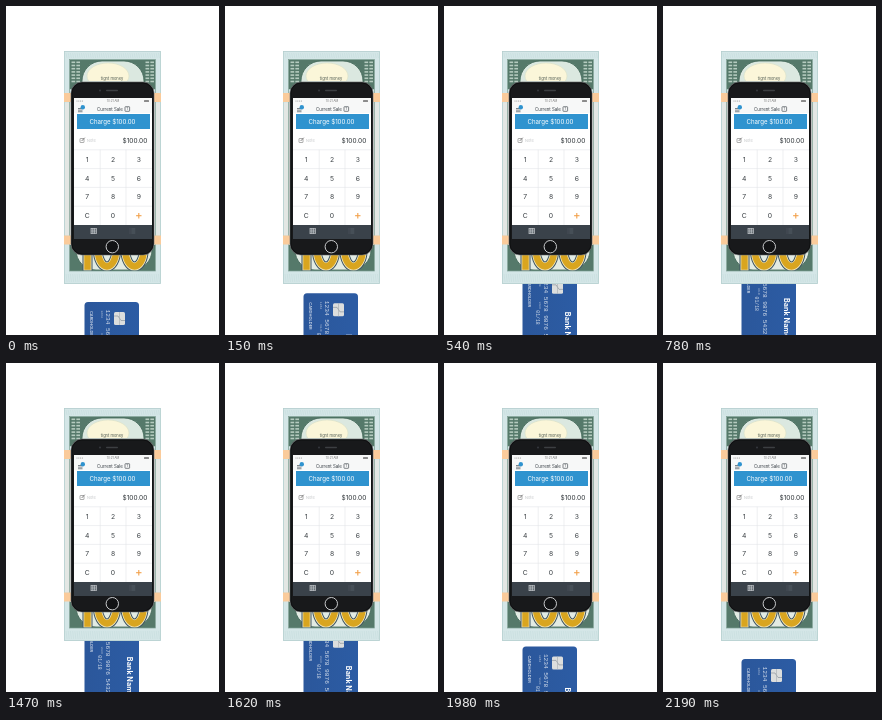
An HTML page with a canvas for the animation above (2550 ms loop, 213 by 329 pixels).

```html
<!DOCTYPE html>
<html lang="en">
<head>
<meta charset="utf-8">
<title>Card payment</title>
<style>
html, body { margin: 0; width: 100%; height: 100%; overflow: hidden; background: #fff; }
canvas { display: block; width: 213px; height: 329px; }
</style>
</head>
<body>
<canvas id="stage"></canvas>
<script>
const W = 213, H = 329, LOOP = 2550, STEP = 30;
const OUT = 296, IN = 251;
const SANS = 'Inter, Lato, sans-serif';
const MONO = '"Liberation Mono", monospace';
const stage = document.getElementById('stage');
const ratio = window.devicePixelRatio || 1;
let c;

function layer(canvas) {
  canvas.width = W * ratio;
  canvas.height = H * ratio;
  const ctx = canvas.getContext('2d');
  ctx.scale(ratio, ratio);
  return ctx;
}

function paint(fill, line, width = 1) {
  if (fill) { c.fillStyle = fill; c.fill(); }
  if (line) { c.strokeStyle = line; c.lineWidth = width; c.stroke(); }
}

function rect(x, y, w, h, fill) {
  c.fillStyle = fill;
  c.fillRect(x, y, w, h);
}

function round(x, y, w, h, r, fill, line, width) {
  c.beginPath();
  c.roundRect(x, y, w, h, r);
  paint(fill, line, width);
}

function ellipse(x, y, rx, ry, fill, line, width) {
  c.beginPath();
  c.ellipse(x, y, rx, ry, 0, 0, Math.PI * 2);
  paint(fill, line, width);
}

function path(points, color, width) {
  c.beginPath();
  points.forEach(([x, y], i) => i ? c.lineTo(x, y) : c.moveTo(x, y));
  paint(null, color, width);
}

function text(str, x, y, size, fill, align = 'center', weight = 400, family = SANS) {
  c.font = `${weight} ${size}px ${family}`;
  c.textAlign = align;
  c.fillStyle = fill;
  c.fillText(str, x, y);
}

// Text that reads downwards, with its baseline on the left.
function textDown(str, x, y, size, fill, weight, family) {
  c.save();
  c.translate(x, y);
  c.rotate(Math.PI / 2);
  text(str, 0, 0, size, fill, 'left', weight, family);
  c.restore();
}

function clipped(x, y, w, h, draw) {
  c.save();
  c.beginPath();
  c.rect(x, y, w, h);
  c.clip();
  draw();
  c.restore();
}

// Ladder of pale bars on the dark engraving.
function ladder(x, y, w, h) {
  for (let i = 0; i < h; i += 3.2) {
    rect(x, y + i, w / 2 - 0.6, 1.6, '#b5cbbf');
    rect(x + w / 2 + 0.6, y + i, w / 2 - 0.6, 1.6, '#b5cbbf');
  }
}

function drawHundred() {
  const outline = [['#3f5560', 10], ['#efe5bc', 8], ['#d9a51f', 6.4]];
  for (const [color, width] of outline) {
    path([[81.5, 236], [81.5, 260.5 + width / 2]], color, width);
    for (const x of [101, 128.5]) ellipse(x, 245, 9, 15.5, null, color, width);
  }
}

function drawBill() {
  rect(58, 45, 97, 233, '#d4e6e7');
  rect(59, 97, 95, 132, '#e3e7e4');
  for (let x = 60; x < 154; x += 2.2) {
    path([[x, 47], [x + 1, 52]], '#c3dadb', 0.5);
    path([[x, 268], [x + 1, 276]], '#c3dadb', 0.5);
  }
  c.strokeStyle = '#b3cdcc';
  c.lineWidth = 0.7;
  c.strokeRect(58.4, 45.4, 96.2, 232.2);

  clipped(63.5, 53.5, 86, 30, () => {
    rect(63.5, 53.5, 86, 30, '#55796a');
    round(76, 55, 62, 50, 20, '#dbe8e0', '#3f6556', 0.8);
    ellipse(102, 70, 21, 13, '#fbf6d9', '#d9dfc4', 0.6);
    rect(78, 75, 58, 8, '#d5e2d8');
  });
  text('tight money', 106, 73.5, 4, '#4d584f');
  ladder(65.5, 55.5, 8.5, 20);
  ladder(139.5, 55.5, 8.5, 20);

  clipped(63.5, 232, 86, 33, () => {
    rect(63.5, 239, 86, 26, '#55796a');
    round(70, 215, 76, 49, 20, '#e2ebe3', '#3f6556', 0.8);
    drawHundred();
  });
  c.strokeStyle = '#7d9e92';
  c.strokeRect(63.5, 53.5, 86, 211.5);
  for (const y of [87, 229.5]) rect(58, y, 97, 9, '#facb9b');
}

function drawHeader() {
  for (let i = 0; i < 4; i++) ellipse(71 + i * 1.8, 95, 0.6, 0.6, '#999');
  text('10:21 AM', 107, 96.2, 3, '#777');
  round(138, 94, 5, 2, 0.5, '#8b8b8b');
  for (let i = 0; i < 3; i++) rect(72, 102 + i * 1.7, 4.5, 0.8, '#5d6870');
  ellipse(76.8, 101.2, 2.2, 2.2, '#2f93cf');
  text('Current Sale', 104, 104.6, 4.4, '#333a40');
  round(119, 100.7, 4.6, 4.6, 0.5, null, '#4b5258', 0.7);
  text('1', 121.3, 104.4, 3.5, '#4b5258');

  rect(71, 108, 73, 15, '#2f93cf');
  text('Charge $100.00', 106.5, 117.9, 6.1, '#fff');

  round(74, 132.5, 4, 4, 0.5, null, '#777', 0.6);
  path([[75.6, 135], [78.8, 131.7]], '#666', 0.8);
  text('Note', 81, 136.2, 3.9, '#c4c6c8', 'left');
  text('$100.00', 141.3, 137.3, 6.5, '#30363a', 'right');
}

function drawKeys() {
  const top = 143.8, rowH = 18.8;
  for (let i = 0; i < 4; i++) {
    path([[68, top + i * rowH], [146, top + i * rowH]], '#e2e5e7', 0.6);
  }
  for (const x of [94.2, 120]) path([[x, top], [x, 219]], '#e2e5e7', 0.6);
  [...'123456789C0+'].forEach((key, i) => {
    const x = 81.2 + (i % 3) * 25.8;
    const y = top + 9.5 + Math.floor(i / 3) * rowH;
    if (key === '+') {
      path([[x - 2.7, y], [x + 2.7, y]], '#f2a14b', 1.1);
      path([[x, y - 2.7], [x, y + 2.7]], '#f2a14b', 1.1);
    } else {
      text(key, x, y + 2.5, 6.8, '#3d4347');
    }
  });
}

function drawTabs() {
  rect(68, 219, 78, 14, '#3a424a');
  c.strokeStyle = '#d9dde0';
  c.lineWidth = 0.6;
  c.strokeRect(85, 222.3, 5.4, 5.4);
  for (const d of [1.8, 3.6]) {
    path([[85 + d, 222.3], [85 + d, 227.7]], '#d9dde0', 0.6);
    path([[85, 222.3 + d], [90.4, 222.3 + d]], '#d9dde0', 0.6);
  }
  for (let i = 0; i < 3; i++) {
    rect(123.5, 222.6 + i * 2, 1, 0.8, '#59626a');
    rect(125.3, 222.6 + i * 2, 4, 0.8, '#59626a');
  }
}

function drawPhone() {
  round(65, 76, 83, 173, 11, '#18191b', '#77797b', 0.7);
  round(66, 77, 81, 171, 10, null, '#0c0d0e', 0.8);
  ellipse(94, 84.5, 1, 1, '#35393e');
  round(100, 83.8, 12, 1.4, 0.7, '#3c3f42');
  rect(68, 92, 78, 141, '#fff');
  rect(68, 92, 78, 15, '#f7f8f8');
  drawHeader();
  drawKeys();
  drawTabs();
  ellipse(106.3, 240.7, 6.2, 6.2, '#111214', '#c9cbcd', 1);
}

function drawCard(top) {
  c.save();
  c.translate(0, top);
  const blue = c.createLinearGradient(79, 0, 133, 0);
  blue.addColorStop(0, '#2b579b');
  blue.addColorStop(1, '#2c5ca4');
  round(78.5, 0, 54.5, 86, 3.5, blue);

  round(108, 10, 11, 13, 1.5, '#dcdedd');
  path([[108, 14], [112, 14], [115, 18.5], [119, 18.5]], '#8f979e', 0.7);
  path([[113.5, 10], [113.5, 23]], '#a5abb0', 0.6);

  textDown('Bank Name', 121, 41, 7.3, '#fff', 700);
  ['1234', '5678', '9876', '5432'].forEach((part, i) => {
    textDown(part, 99.7, 7.5 + i * 18.4, 6.2, '#d4ddea', 400, MONO);
  });
  textDown('1234', 95, 8.5, 3, '#b9c7dc', 400, MONO);
  textDown('VALID', 94.5, 31, 2.5, '#b9c7dc');
  textDown('01/18', 92.3, 39.5, 4.8, '#d4ddea', 400, MONO);
  textDown('CARDHOLDER', 84, 9, 4, '#e3e9f2', 500);
  c.restore();
}

function cardTop(ms) {
  const t = Math.floor(ms / STEP) * STEP;
  if (t <= 780) return OUT + (IN - OUT) * t / 780;
  if (t < 1470) return IN;
  return IN + (OUT - IN) * Math.min(1, (t - 1440) / 750);
}

const front = document.createElement('canvas');
c = layer(front);
drawBill();
drawPhone();
c = layer(stage);

const start = performance.now();
function frame() {
  const ms = (performance.now() - start) % LOOP;
  rect(0, 0, W, H, '#fff');
  drawCard(cardTop(ms));
  c.drawImage(front, 0, 0, W, H);
  requestAnimationFrame(frame);
}
frame();
</script>
</body>
</html>
```
